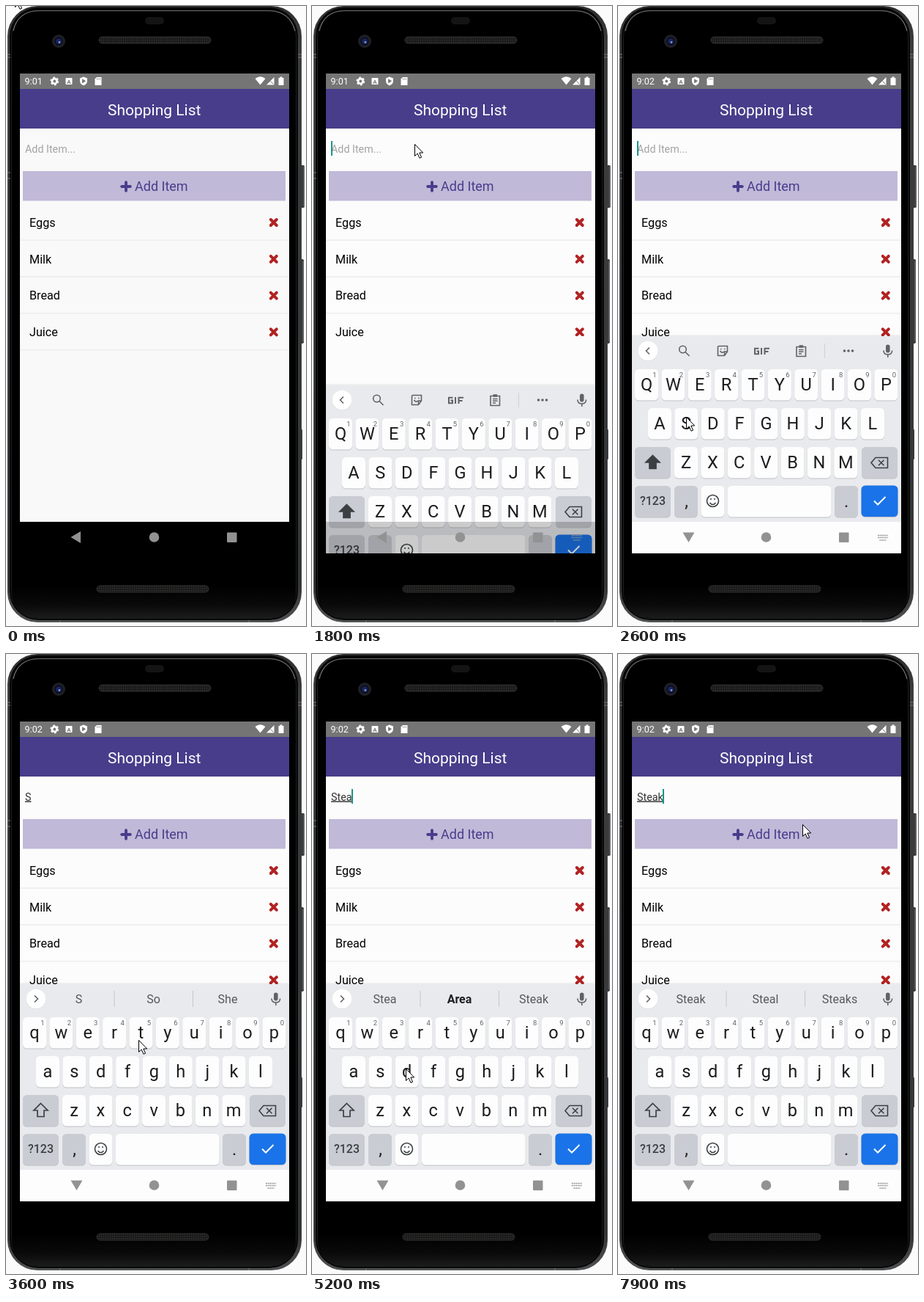
Recreate the animation shown at these times as an HTML page. Size 410 by 845 pixels, loop 8 s.

```html
<!DOCTYPE html>
<html lang="en">
<head>
<meta charset="utf-8">
<title>Shopping List</title>
<style>
html, body { margin: 0; width: 100%; height: 100%; overflow: hidden; background: #fbfbfb; }
svg { display: block; width: 410px; height: 845px; font-family: Roboto, sans-serif; }
.mid { text-anchor: middle; }
.line { fill: none; stroke: #5f6368; stroke-width: 1.6; }
.dark { stroke: #3c4043; }
.key { fill: #fdfdfd; }
.mod { fill: #c9ccd3; }
.done { fill: #1a73e8; }
.glyph { font-size: 23.6px; fill: #1c1c1e; text-anchor: middle; }
.digit { font-size: 9.5px; fill: #5f6368; text-anchor: middle; }
.hint { font-size: 16px; fill: #55595e; text-anchor: middle; }
.hint.bold { font-weight: 700; fill: #202124; }
#typed { font-size: 14.3px; fill: #333; text-decoration: underline 1px; }
</style>
</head>
<body>
<svg viewBox="0 0 410 845">
  <defs>
    <linearGradient id="rim" x2="0" y2="1">
      <stop offset="0" stop-color="#2c2d2f"/><stop offset=".06" stop-color="#3c3d3f"/>
      <stop offset=".94" stop-color="#343537"/><stop offset="1" stop-color="#505153"/>
    </linearGradient>
    <linearGradient id="chin" x2="0" y2="1">
      <stop offset="0" stop-color="#000"/><stop offset=".6" stop-color="#0a0a0a"/><stop offset="1" stop-color="#1b1b1b"/>
    </linearGradient>
    <pattern id="mesh" width="3" height="3" patternUnits="userSpaceOnUse">
      <rect width="3" height="3" fill="#191919"/><circle cx="1.5" cy="1.5" r=".8" fill="#3b3a36"/>
    </pattern>
    <clipPath id="screen"><rect x="19" y="92" width="368" height="654"/></clipPath>
    <clipPath id="appClip"><rect id="appArea" x="19" y="92" width="368" height="611"/></clipPath>
  </defs>

  <!-- phone body -->
  <g fill="#3a3b3d">
    <rect x="401" y="217" width="7" height="58" rx="2"/>
    <rect x="401" y="345" width="6" height="115" rx="2"/>
    <rect x="400" y="577" width="5" height="41" rx="1"/>
  </g>
  <path d="M407 219V273M406 348V457" stroke="#77787a"/>
  <rect x="2" y="0" width="402" height="840" rx="41" fill="url(#rim)"/>
  <rect x="5" y="2" width="394" height="835" rx="39" fill="#060606"/>
  <rect x="7.500" y="6.500" width="389" height="828" rx="36" fill="#000" stroke="#1d1e1f"/>
  <path d="M10 34Q16 7 44 6.500H360Q388 7 395 34" fill="none" stroke="#707173" stroke-width="1.2"/>
  <path d="M8 790H396V797Q396 834 359 834H46Q8 834 8 797Z" fill="url(#chin)"/>
  <path d="M2 66H6M2 70H6M399 66H404M399 70H404M2 227H6M2 235H6M74 837V840M332 837V840" stroke="#77787a"/>
  <rect x="190" y="15" width="26" height="10" rx="5" fill="#141414"/>
  <rect x="127" y="42" width="153" height="9" rx="4.5" fill="url(#mesh)" stroke="#303030"/>
  <rect x="124" y="790" width="153" height="9" rx="4.5" fill="url(#mesh)" stroke="#303030"/>
  <circle cx="72" cy="48" r="9" fill="#1f2023"/><circle cx="72" cy="48" r="6" fill="#0e1026"/>
  <circle cx="72" cy="48" r="3.600" fill="#1b2760"/><circle cx="73" cy="49.500" r="1.400" fill="#7d95d6"/>

  <!-- app -->
  <g clip-path="url(#screen)">
    <rect id="paper" x="19" y="92" width="368" height="611"/>
    <g clip-path="url(#appClip)">
      <rect x="19" y="92" width="368" height="21" fill="#757575"/>
      <text id="clock" x="25.5" y="107" font-size="12.6" fill="#fff"></text>
      <g fill="#fff">
        <circle cx="66.3" cy="102.5" r="3.3" fill="none" stroke="#fff" stroke-width="2.8"/>
        <circle cx="66.3" cy="102.5" r="5" fill="none" stroke="#fff" stroke-width="1.8" stroke-dasharray="2.6 2.636"/>
        <rect x="81.5" y="98" width="9" height="9" rx="1"/>
        <path d="M106 96.5L111 98.5V102Q111 106.500 106 108.5Q101 106.500 101 102V98.5Z"/>
        <path d="M124 97H130.5V108H121.5V99.5Z"/>
        <path d="M340.500 99Q347.500 93.500 354.500 99L347.500 107.500Z"/>
        <path d="M366.500 97V107.500H356Z"/>
        <path d="M374.500 96.500H377.500V98H379.500V108H372.500V98H374.500Z"/>
      </g>
      <text x="86" y="105.5" font-size="8" font-weight="700" fill="#757575" class="mid">A</text>
      <path d="M104.5 99.8L108.5 102.3L104.5 104.8ZM124.5 98.5V100.5M126.5 98.5V100.5M128.5 98.5V100.5" fill="#757575" stroke="#757575" stroke-width=".8"/>
      <path d="M361.5 102.5L365.5 106.5" stroke="#757575"/>
      <rect x="19" y="113" width="368" height="54" fill="#483d8b"/>
      <text x="202.7" y="148.800" font-size="21" fill="#fff" class="mid">Shopping List</text>
      <text id="placeholder" x="26" y="199.5" font-size="14.3" fill="#a3a3a3">Add Item...</text>
      <text id="typed" x="26" y="199.5"></text>
      <rect id="caret" y="184" width="2" height="20" fill="#1a9488"/>
      <rect x="23" y="225" width="359" height="40.5" fill="#c1b9d8"/>
      <path d="M164 240.2V251.8M158.2 246H169.8" stroke="#483d8b" stroke-width="3.9" stroke-linecap="round"/>
      <text x="176" y="252.3" font-size="18" fill="#483d8b">Add Item</text>
      <g id="rows"></g>
    </g>

    <g id="board"></g>
    <g id="popup">
      <rect x="-19" y="-61" width="38" height="106" rx="4" fill="#777" opacity=".35"/>
      <rect x="-18.5" y="-62.5" width="37" height="105.5" rx="4" fill="#c9ccd3"/>
      <text id="popupGlyph" class="glyph" y="-29.5"></text>
    </g>

    <rect id="bar" x="19" y="703" width="368" height="43"/>
    <g fill="#929292">
      <path id="back" d="M88.5 724L102 716V732Z"/>
      <circle cx="202.5" cy="724" r="6.8"/>
      <rect x="302" y="717.5" width="13.5" height="13.5" rx="1"/>
      <path id="switcher" d="M355 721.5H369M355 724.5H369M357.5 728H366.5" stroke="#8c8c8c" stroke-width="1.7" stroke-dasharray="1.7 .9"/>
    </g>
  </g>
  <path id="mouse" d="M.5 .5V16.5L4.2 13L7 19.3L9.6 18.2L6.8 12H11.7Z" fill="#fff" stroke="#000"/>
</svg>

<script>
const $ = id => document.getElementById(id);
const show = (el, on) => el.style.display = on ? '' : 'none';

$('rows').innerHTML = ['Eggs', 'Milk', 'Bread', 'Juice'].map((name, i) => {
  const y = 295 + i * 49.8;
  return `<text x="32" y="${y + 5.7}" font-size="16.2" fill="#000">${name}</text>
    <path d="M361.8 ${y - 4}l8 8m0 -8l-8 8" stroke="#b22222" stroke-width="4" stroke-linecap="round"/>
    <path d="M19 ${y + 24.2}H387" stroke="#ebebeb" stroke-width="1.3"/>`;
}).join('');

// Keyboard
const PITCH = 36.37;
const keyRows = [['qwertyuiop', 39, 495], ['asdfghjkl', 57, 548], ['zxcvbnm', 93, 601]];
const keyAt = {};
const keyBox = (x, y, w, cls) =>
  `<rect x="${x}" y="${y + 1}" width="${w}" height="42.5" rx="5.5" fill="#bfc1c6"/>
   <rect x="${x}" y="${y}" width="${w}" height="42.5" rx="5.5" class="${cls}"/>`;

let board = `<rect x="19" y="448" width="368" height="2" fill="#000" opacity=".05"/>
  <rect x="19" y="450" width="368" height="300" fill="#e8eaed"/>
  <circle cx="41" cy="470.6" r="13.5" fill="#d8dadd"/><circle cx="41" cy="470" r="13.3" fill="#fff"/>
  <path id="chevron" class="line" d="M43 465.5L38.5 470L43 474.5"/>
  <g id="tools">
    <g class="line">
      <circle cx="88.5" cy="468" r="4.8"/><path d="M92 471.5L97.5 477"/>
      <path d="M138 463.5H149.5V471L145.5 476.5H136.5V465Q136.5 463.5 138 463.5ZM149.5 471H145.5V476.5M139.5 470Q142 474 144.5 471M140 467.5H141.5M145 467.5H146.5"/>
      <path d="M244 464.5H256.5V477.5H244ZM247 468.5H253.5M247 471.3H253.5M247 474H251"/>
      <path d="M247.5 464H253" stroke-width="3.5"/>
      <path d="M192.5 466.8H187V474.2H192V470.5H189.5M196 466V475M207 466.8H200.5V475M200.5 471H205.5" stroke-width="2"/>
    </g>
    <path d="M282.5 460V480" stroke="#cfd1d4"/>
    <g fill="#5f6368"><circle cx="309.5" cy="470" r="1.8"/><circle cx="315" cy="470" r="1.8"/><circle cx="320.5" cy="470" r="1.8"/></g>
  </g>
  <g id="hints">
    <path d="M148 459V481M255.5 459V481" stroke="#c4c6ca"/>
    <text class="hint" x="99.5" y="476"></text><text class="hint" x="201.5" y="476"></text><text class="hint" x="303" y="476"></text>
  </g>
  <rect x="366" y="461.5" width="5.6" height="11" rx="2.8" fill="#5f6368"/>
  <path class="line" d="M363 469.5Q363 475 368.8 475T374.6 469.5M368.8 475V479"/>`;

for (const [letters, x0, y] of keyRows)
  [...letters].forEach((ch, i) => {
    const x = x0 + i * PITCH;
    keyAt[ch] = [x, y];
    board += keyBox(x - 16, y, 32, 'key') + `<text class="glyph" x="${x}" y="${y + 29}" data-ch="${ch}"></text>`;
    if (y === 495) board += `<text class="digit" x="${x + 11}" y="${y + 11}">${(i + 1) % 10}</text>`;
  });

board += keyBox(23, 601, 49, 'mod') + keyBox(333, 601, 49, 'mod') +
  keyBox(23, 654, 49, 'mod') + keyBox(77, 654, 32, 'mod') + keyBox(113.5, 654, 32, 'key') +
  keyBox(150, 654, 141.5, 'key') + keyBox(296, 654, 32, 'mod') + keyBox(332.5, 653.5, 50, 'done') +
  `<path id="shift" class="dark" d="M47.5 612.5L57 622H52V630.5H43V622H38Z" stroke-width="1.7"/>
  <path class="line dark" d="M352 615.5H368.5V629.5H352L346 622.5ZM356 618.8L363.5 626.3M363.5 618.8L356 626.3"/>
  <text x="47.5" y="680" class="mid" font-size="16" font-weight="500" fill="#3c4043">?123</text>
  <text class="glyph" x="93.5" y="683">,</text><text class="glyph" x="312" y="683">.</text>
  <g class="line dark"><circle cx="129.5" cy="674.5" r="8"/><path d="M125.5 677Q129.5 682 133.5 677M126 672H128M131 672H133"/></g>
  <path d="M350 674.5L355 679.5L365.5 669" fill="none" stroke="#fff" stroke-width="2"/>`;
$('board').innerHTML = board;

const glyphs = [...document.querySelectorAll('[data-ch]')];
const hintTexts = [...document.querySelectorAll('.hint')];

// [ms, text, suggestions]
const edits = [
  [1600, '', []],
  [2900, 'S', ['S', 'So', 'She']],
  [3800, 'St', ['St', 'So', 'Still']],
  [4300, 'Ste', ['Ste', 'The', 'Step']],
  [4900, 'Stea', ['Stea', 'Area', 'Steak']],
  [7000, 'Steak', ['Steak', 'Steal', 'Steaks']]
];
// [ms, x, y]
const mousePath = [
  [100, 11.5, -15], [800, 130, 180], [1000, 130, 180], [1300, 140, 188], [1800, 140, 188],
  [2600, 93, 560], [2700, 93, 560], [2800, 93, 549], [3000, 93, 549], [3500, 181, 526], [3800, 181, 526],
  [4100, 108, 516], [4300, 108, 516], [4700, 55, 574], [5100, 55, 574], [5200, 128, 565],
  [6000, 315, 573], [6600, 315, 573], [6800, 310, 571], [7300, 310, 571], [7600, 308, 550],
  [7700, 308, 550], [7900, 252, 232]
];
const slidePath = [[1800, 67], [1900, 18], [2000, 0]];
const turnPath = [[1800, 0], [2100, -90]];

function along(path, t) {
  if (t <= path[0][0]) return path[0].slice(1);
  const i = path.findIndex(p => p[0] > t);
  if (i < 0) return path[path.length - 1].slice(1);
  const [a, b] = [path[i - 1], path[i]];
  const k = (t - a[0]) / (b[0] - a[0]);
  return a.slice(1).map((v, j) => v + (b[j + 1] - v) * k);
}

function drawField(t, edit, text) {
  $('typed').textContent = text;
  show($('placeholder'), !text);
  const age = edit ? t - edit[0] + (text ? 100 : 0) : 0;
  show($('caret'), edit && age % 1000 < 500);
  $('caret').setAttribute('x', Math.floor(26 + (text && $('typed').getComputedTextLength())));
}

function drawBoard(t, edit, caps) {
  show($('board'), t >= 1800);
  $('board').setAttribute('transform', `translate(0 ${along(slidePath, t)[0]})`);
  show($('tools'), caps);
  show($('hints'), !caps);
  $('chevron').setAttribute('transform', caps ? '' : 'translate(82 0) scale(-1 1)');
  $('shift').setAttribute('fill', caps ? '#3c4043' : 'none');
  glyphs.forEach(g => g.textContent = caps ? g.dataset.ch.toUpperCase() : g.dataset.ch);
  hintTexts.forEach((h, i) => {
    h.textContent = edit && edit[2][i] || '';
    h.classList.toggle('bold', h.textContent === 'Area');
  });

  const next = edits.find(e => e[1] && t >= e[0] - 100 && t < e[0]);
  show($('popup'), next);
  if (next) {
    const ch = next[1].slice(-1);
    $('popup').setAttribute('transform', `translate(${keyAt[ch.toLowerCase()]})`);
    $('popupGlyph').textContent = ch;
  }
}

function draw(t) {
  const open = t >= 1800, settled = t >= 2000;
  const edit = edits.filter(e => e[0] <= t).pop();
  const text = edit ? edit[1] : '';

  $('paper').setAttribute('fill', open ? '#fcfcfc' : '#f9f9f9');
  $('appArea').setAttribute('height', open ? 358 : 611);
  $('clock').textContent = t < 2200 ? '9:01' : '9:02';
  drawField(t, edit, text);
  drawBoard(t, edit, !text);

  $('bar').setAttribute('fill', settled ? '#fdfdfd' : '#000');
  $('bar').setAttribute('opacity', open && !settled ? .2 : 1);
  $('back').setAttribute('transform', `rotate(${along(turnPath, t)[0]} 96 723.5)`);
  show($('switcher'), t >= 1600);
  $('mouse').setAttribute('transform', `translate(${along(mousePath, t).map(Math.round)})`);
}

function tick() {
  draw(Math.floor(performance.now() % 8000 / 100) * 100);
  requestAnimationFrame(tick);
}
tick();
</script>
</body>
</html>
```
